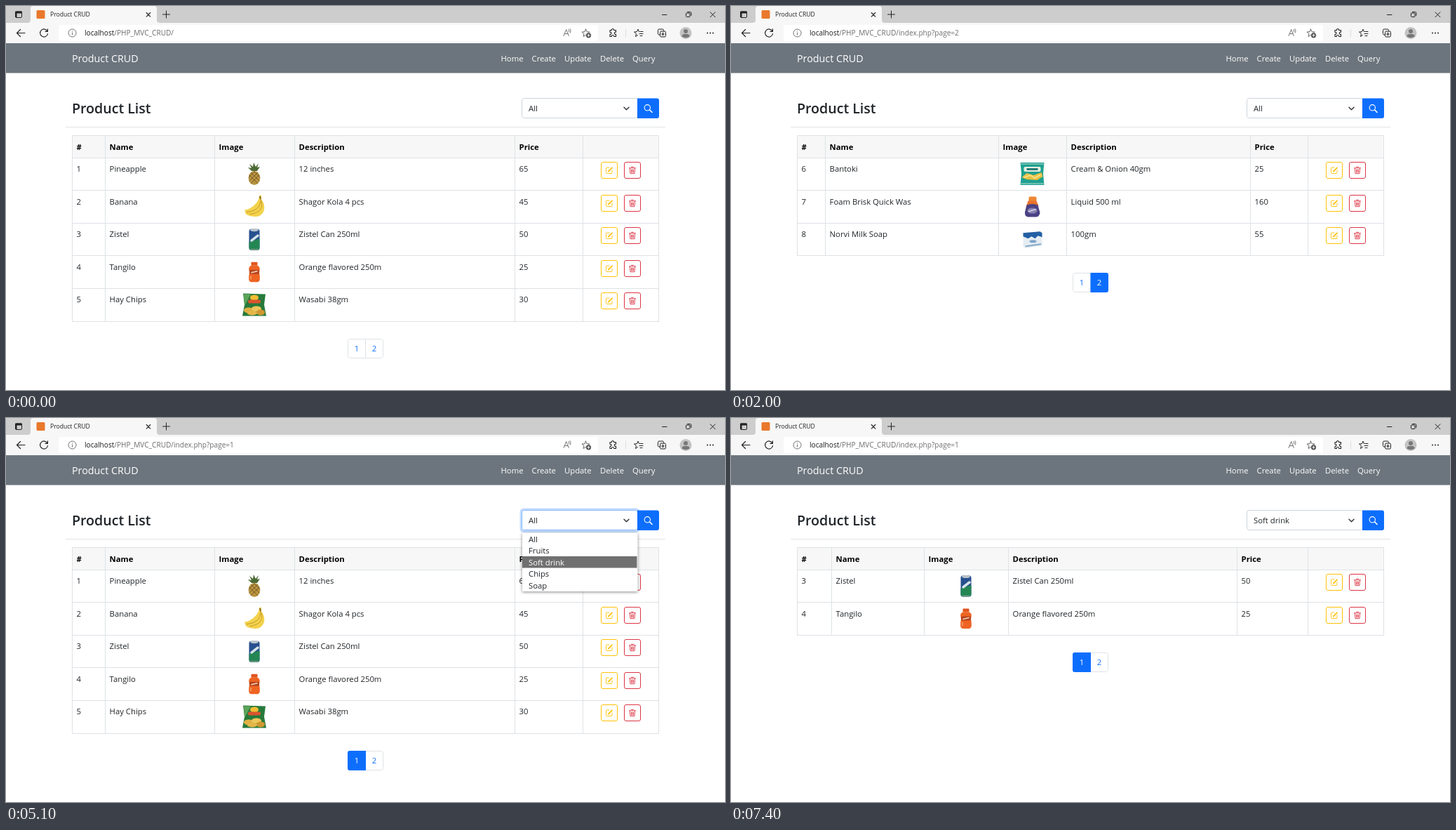
These frames come from a looping animation (1025 by 547 pixels, 8000 ms). An HTML page:

```html
<!DOCTYPE html>
<html lang="en">
<head>
<meta charset="utf-8">
<title>Product CRUD</title>
<style>
  html, body { margin: 0; width: 100%; height: 100%; overflow: hidden; background: #fff; }
  svg { display: block; font: 11.3px "Open Sans", "Noto Sans", sans-serif; fill: #212529; }
  text { white-space: pre; }
  .bold { font-weight: 700; fill: #000; }
  .title { font-size: 19.6px; font-weight: 600; }
  .brand { font-size: 14.3px; fill: #fff; }
  .white { fill: #fff; }
  .link { fill: #0d6efd; }
  .tab { font-size: 8.6px; fill: #222; }
  .url { font-size: 10.1px; fill: #1b1b1b; }
  .url tspan { fill: #6d6d6d; }
  .mid { text-anchor: middle; }
  .grid { stroke: #dee2e6; shape-rendering: crispEdges; }
</style>
</head>
<body>
<svg id="stage" width="1025" height="547" viewBox="0 0 1025 547"></svg>
<script>
const LOOP = 8000, ROW = 46.6, TOP = 216, BLUE = '#0d6efd';

const rect = (x, y, w, h, fill, rx = 0, extra = '') =>
  `<rect x="${x}" y="${y}" width="${w}" height="${h}" rx="${rx}" fill="${fill}" ${extra}/>`;
const shape = (d, fill) => `<path d="${d}" fill="${fill}"/>`;
const line = (d, color = '#222', width = 1) =>
  `<path d="${d}" fill="none" stroke="${color}" stroke-width="${width}" stroke-linecap="round" stroke-linejoin="round"/>`;
const ellipse = (x, y, rx, ry, fill, extra = '') =>
  `<ellipse cx="${x}" cy="${y}" rx="${rx}" ry="${ry}" fill="${fill}" ${extra}/>`;
const text = (x, y, str, cls = '') => `<text x="${x}" y="${y}" class="${cls}">${str}</text>`;
const at = (x, y, content) => `<g transform="translate(${x} ${y})">${content}</g>`;

// Product pictures, drawn around their centre
const pictures = {
  pineapple:
    shape('M-4-4L-9-9-4-8-7-14-2-10-1-16 2-10 6-15 4-9 8-10 4-4Z', '#4d6b35') +
    ellipse(0, 6, 8.3, 10, '#b8933f') +
    line('M-7 2L5 14M-5-2L7 10M0-3L8 5M7 2L-5 14M5-2L-7 10M0-3L-8 5', '#765c26', .9),
  banana:
    shape('M7-15L10-16 10-10C16-3 16 8 8 13 2 16-8 14-12 11L-14 5C-6 4 2-2 6-10Z', '#f3d24c') +
    line('M9-9C9 1 2 7-11 8', '#c4992b', 1) + line('M10-8C13 2 8 9-6 11', '#c4992b', 1) +
    line('M8-14L9-11', '#8a732b', 2),
  can:
    rect(-7.5, -14.5, 15, 30, '#27508f', 3) +
    shape('M-7.5 4L7.5-1V12Q7 15.5 4 15.5H-4Q-7 15.5-7.5 12Z', '#238653') +
    ellipse(0, -13, 6, 2, '#b9c3ca') + line('M-4 2L5-5', '#d4e5e6', 3.5) +
    line('M-5 14.5H5', '#86988f', 1.4),
  bottle:
    rect(-4.5, -14, 9, 5, '#e2541c', 1) +
    shape('M-5-9H5Q8-7 7.8-4L7 1 7.8 6V11Q7 14.5 4 14.5H-4Q-7 14.5-7.8 11V6L-7 1-7.8-4Q-8-7-5-9Z', '#ee6423') +
    rect(-7, -3, 14, 6, '#b5441f', 1) + line('M-4 1L4-1', '#f5d6bb', 1.5) + line('M-5 10V6', '#f7a46c', 1.5),
  chips:
    shape('M-16-16L16-15 14 0 17 16H-17L-14 0Z', '#277a3b') +
    shape('M-15-15L-5-15-14 2Z', '#5ca558') +
    ellipse(0, -10, 6, 4, '#f0bd32') + rect(-9, -7, 18, 5, '#d9542e', 2) +
    ellipse(-8, 8, 7, 4, '#dfb044') + ellipse(3, 6, 7, 4, '#edc65a') +
    ellipse(9, 11, 6, 4, '#cf9730') + ellipse(-3, 12, 7, 3, '#e5b64a'),
  snack:
    shape('M-17-16H17L15.5 0 17 16H-17L-15.5 0Z', '#1fa091') +
    line('M-16-14H16M-16 14H16', '#8bcbbd', 1.5) +
    rect(-12, -10, 24, 7, '#e5efe0', 2) + rect(-8, -8, 16, 3, '#287a79') +
    shape('M-15 5L-8-1 2 2 13-2 15 4 7 9-8 8Z', '#e7c044') + line('M-11 5L-3 2 3 6 11 2', '#f4df82', 2),
  detergent:
    rect(-5, -14, 11, 7, '#ed8733', 2) + shape('M-6-8H6L9-1-9 1Z', '#e9732c') +
    shape('M-8-2Q0-5 8-2L11 9Q10 15 5 15H-6Q-11 14-10.5 8Z', '#4b4184') +
    ellipse(0, 6, 7, 4, '#8783b2') + line('M-5 7L5 4', '#dfdcec', 1.5),
  soap:
    shape('M-13-9L11-11 14-9V9L-10 13-13 10Z', '#e5edf3') +
    shape('M-13-9L11-11 14-9V-3L8-5 4-1-1-4-6-1-13-4Z', '#2360a4') +
    ellipse(1, 3, 5, 2, '#7fa4cb') + line('M-9 10L12 7', '#87a9c5', 2)
};

const products = [
  ['Pineapple', 'pineapple', '12 inches', 65],
  ['Banana', 'banana', 'Shagor Kola 4 pcs', 45],
  ['Zistel', 'can', 'Zistel Can 250ml', 50],
  ['Tangilo', 'bottle', 'Orange flavored 250m', 25],
  ['Hay Chips', 'chips', 'Wasabi 38gm', 30],
  ['Bantoki', 'snack', 'Cream &amp; Onion 40gm', 25],
  ['Foam Brisk Quick Was', 'detergent', 'Liquid 500 ml', 160],
  ['Norvi Milk Soap', 'soap', '100gm', 55]
];

const wide = [94, 141, 297, 411, 725, 822, 930];
const views = [
  { start: 0, path: '', cols: wide, ids: [1, 2, 3, 4, 5] },
  { start: 500, path: 'index.php?page=2', cols: [94, 134, 381, 478, 740, 822, 930], ids: [6, 7, 8], page: 2 },
  { start: 3000, path: 'index.php?page=1', cols: wide, ids: [1, 2, 3, 4, 5], page: 1, open: true },
  { start: 6500, path: 'index.php?page=1', cols: [94, 143, 275, 395, 721, 822, 930], ids: [3, 4], page: 1, filter: 'Soft drink' }
];

const star = 'M0-5.5L1.6-1.8 5.5-1.5 2.5 1.1 3.5 5 0 2.9-3.5 5-2.5 1.1-5.5-1.5-1.6-1.8Z';
const cross = r => `M${-r} ${-r}L${r} ${r}M${r} ${-r}L${-r} ${r}`;

function browser() {
  return rect(0, 0, 1025, 24, '#cdcdcd') + rect(0, 24, 1025, 29, '#f7f7f7') +
    shape('M31 24Q35 24 35 20V4Q35 0 39 0H211Q215 0 215 4V20Q215 24 219 24Z', '#f7f7f7') +
    rect(13.5, 8, 9, 8.5, 'none', 1.5, 'stroke="#222"') + rect(13, 7.5, 10, 3, '#222', 1) + rect(13, 8, 2.5, 8, '#222') +
    rect(43.5, 6, 12, 12, '#e9782c', 1.5) + text(63, 15.3, 'Product CRUD', 'tab') +
    at(203, 12.3, line(cross(2.8), '#222', 1.1)) + line('M223.5 12H233.5M228.5 7V17') +
    line('M935.5 12.5H942') + rect(969.5, 10, 5.5, 5.5, 'none', 1, 'stroke="#222"') +
    line('M971.5 8.5H975.5Q976.8 8.5 976.8 10V13.5') + at(1007.5, 12.3, line(cross(3.5))) +
    line('M27 38.5H15.5M20.5 33.5L15.5 38.5 20.5 43.5', '#222', 1.2) +
    line('M59 36A5.5 5.5 0 1 0 59.5 39.5M59.4 32.8V36.3H56', '#222', 1.2) +
    rect(75, 27, 769, 23, '#fff', 3) +
    ellipse(94.5, 38.5, 5.5, 5.5, 'none', 'stroke="#6d6d6d"') + line('M94.5 38V41M94.5 35.8V36', '#6d6d6d') +
    line('M795 42.5L798.7 33.5 802.3 42.5M796.3 39.5H801M802 33.5Q803.5 35 802.5 37M804 32.5Q806 35 804.5 38', '#666', .9) +
    at(826.5, 38.5, line(star, '#666')) + ellipse(830.5, 41.8, 3.6, 3.6, '#555') + line('M828.8 41.8H832.2M830.5 40.1V43.5', '#fff', .9) +
    line('M861 34.5H863.5Q863.3 32.5 865 32.5T866.5 34.5H869.5V37.2Q867.3 36.8 867.3 38.7T869.5 40.2V43.5H866.8Q866.8 41.5 865 41.5T863.3 43.5H861V40.5Q863 40.5 863 38.8T861 37.2Z', '#222', 1.1) +
    line('M883.5 33V44', '#ddd') +
    at(901, 38.5, line('M1.6-1.8L0-5.5-1.6-1.8-5.5-1.5-2.5 1.1-3.5 5-.5 3M3-2H7M2 1H7M3 4H6')) +
    rect(929.5, 33, 8, 8, 'none', 1.5, 'stroke="#222"') + rect(932.5, 36, 8, 8, '#f7f7f7', 1.5, 'stroke="#222"') +
    line('M934.5 40H938.5M936.5 38V42') +
    ellipse(969, 38.5, 8.5, 8.5, '#c4c4c4') + ellipse(969, 36, 3, 3, '#777') + shape('M963.5 43.5Q963.5 40 967 40H971Q974.5 40 974.5 43.5Q969 47 963.5 43.5Z', '#777') +
    [1000, 1004, 1008].map(x => ellipse(x, 38.5, 1, 1, '#222')).join('');
}

function pageHead() {
  const links = [['Home', 705.5], ['Create', 749.5], ['Update', 796], ['Delete', 847], ['Query', 893]];
  return rect(0, 53, 1025, 42.5, '#6c757d') + text(94, 80, 'Product CRUD', 'brand') +
    links.map(([label, x]) => text(x, 79, label, 'white')).join('') +
    text(94, 152.5, 'Product List', 'title') + rect(85, 172, 855, 1, '#e2e3e4');
}

function button(x, y, color, icon) {
  return rect(x + .5, y + .5, 23, 23, '#fff', 2.5, `stroke="${color}"`) + at(x + 12, y + 12, icon);
}
const pencil = line('M0-4H-3.5Q-4.5-4-4.5-3V3.5Q-4.5 4.5-3.5 4.5H3Q4 4.5 4 3.5V0', '#ffc107', .9) +
  line('M4-3.7L-1.3 1.6', '#ffc107', 1.7);
const trash = line('M-4.5-3.2H4.5M-1.5-4.7H1.5M-3.6-3L-3 4.7H3L3.6-3M-1.4-1V3M0-1V3M1.4-1V3', '#dc3545', .9);

function table({ cols, ids }) {
  const bottom = TOP + ROW * ids.length;
  const cell = (col, y, str, cls) => text(cols[col] + 6.6, y, str, cls);
  const heads = ['#', 'Name', 'Image', 'Description', 'Price'];
  const rules = cols.map(x => `M${x + .5} 185V${bottom}`).join('') +
    [184.5, ...Array.from({ length: ids.length + 1 }, (_, i) => TOP + i * ROW)].map(y => `M94 ${y}H931`).join('');
  const rows = ids.map((id, i) => {
    const y = TOP + i * ROW, buttonY = Math.round(y + 6);
    const [name, picture, description, price] = products[id - 1];
    return cell(0, y + 20, id) + cell(1, y + 20, name) + cell(3, y + 20, description) + cell(4, y + 20, price) +
      at((cols[2] + cols[3]) / 2, y + 23, pictures[picture]) +
      button(848, buttonY, '#ffc107', pencil) + button(881, buttonY, '#dc3545', trash);
  });
  return rect(94, 185, 837, 31, '#f7f7f7') + `<path class="grid" fill="none" d="${rules}"/>` +
    heads.map((label, i) => cell(i, 205, label, 'bold')).join('') + rows.join('');
}

function pager({ ids, page }) {
  const y = Math.round(TOP + ROW * ids.length + 24.5);
  const active = page === 1 ? shape(`M513 ${y}H490Q487 ${y} 487 ${y + 3}V${y + 25}Q487 ${y + 28} 490 ${y + 28}H513Z`, BLUE)
    : page === 2 ? shape(`M512.5 ${y}H535Q538 ${y} 538 ${y + 3}V${y + 25}Q538 ${y + 28} 535 ${y + 28}H512.5Z`, BLUE) : '';
  return rect(487.5, y + .5, 50, 27, '#fff', 3, 'stroke="#dee2e6"') + line(`M512.5 ${y + 1}V${y + 27}`, '#dee2e6') + active +
    [1, 2].map(n => text(475 + n * 25, y + 18.2, n, 'mid ' + (n === page ? 'white' : 'link'))).join('');
}

function filterBox({ filter = 'All', open }) {
  const glow = open ? rect(734, 130, 168, 31.5, 'none', 4, 'stroke="#c2dbfe" stroke-width="3"') : '';
  return glow + rect(735.5, 131.5, 165, 28, '#fff', 3, `stroke="${open ? '#86b7fe' : '#ced4da'}"`) +
    text(745, 150, filter) + line('M881 144.3L884.5 147.8 888 144.3', '#343a40', 1.5) +
    shape('M900 131.5H928Q931 131.5 931 134.5V157Q931 160 928 160H900Z', BLUE) +
    ellipse(914.3, 144.8, 4.2, 4.2, 'none', 'stroke="#fff" stroke-width="1.1"') + line('M917.6 148L921 151.4', '#fff', 1.5);
}

function dropdown() {
  const options = ['All', 'Fruits', 'Soft drink', 'Chips', 'Soap'];
  return rect(736, 163.5, 164.5, 83.5, '#fff', 0, 'style="filter:drop-shadow(0 1px 2px #0007)"') +
    rect(736, 197, 163.5, 16.5, '#707070') +
    options.map((label, i) => text(745, 176.5 + i * 16.6, label, i === 2 ? 'white' : '')).join('');
}

const render = view =>
  `<g class="view">${text(112, 42.2, `localhost<tspan>/PHP_MVC_CRUD/${view.path}</tspan>`, 'url')}` +
  filterBox(view) + table(view) + pager(view) + (view.open ? dropdown() : '') + '</g>';

const stage = document.getElementById('stage');
stage.innerHTML = browser() + pageHead() + views.map(render).join('');

// Each view holds its opacity until the next start time
const starts = [...views.map(view => view.start), LOOP];
stage.querySelectorAll('.view').forEach((group, i) => {
  const steps = starts.map((time, j) => ({ offset: time / LOOP, opacity: j === i ? 1 : 0, easing: 'step-end' }));
  group.animate(steps, { duration: LOOP, iterations: Infinity });
});
</script>
</body>
</html>
```
